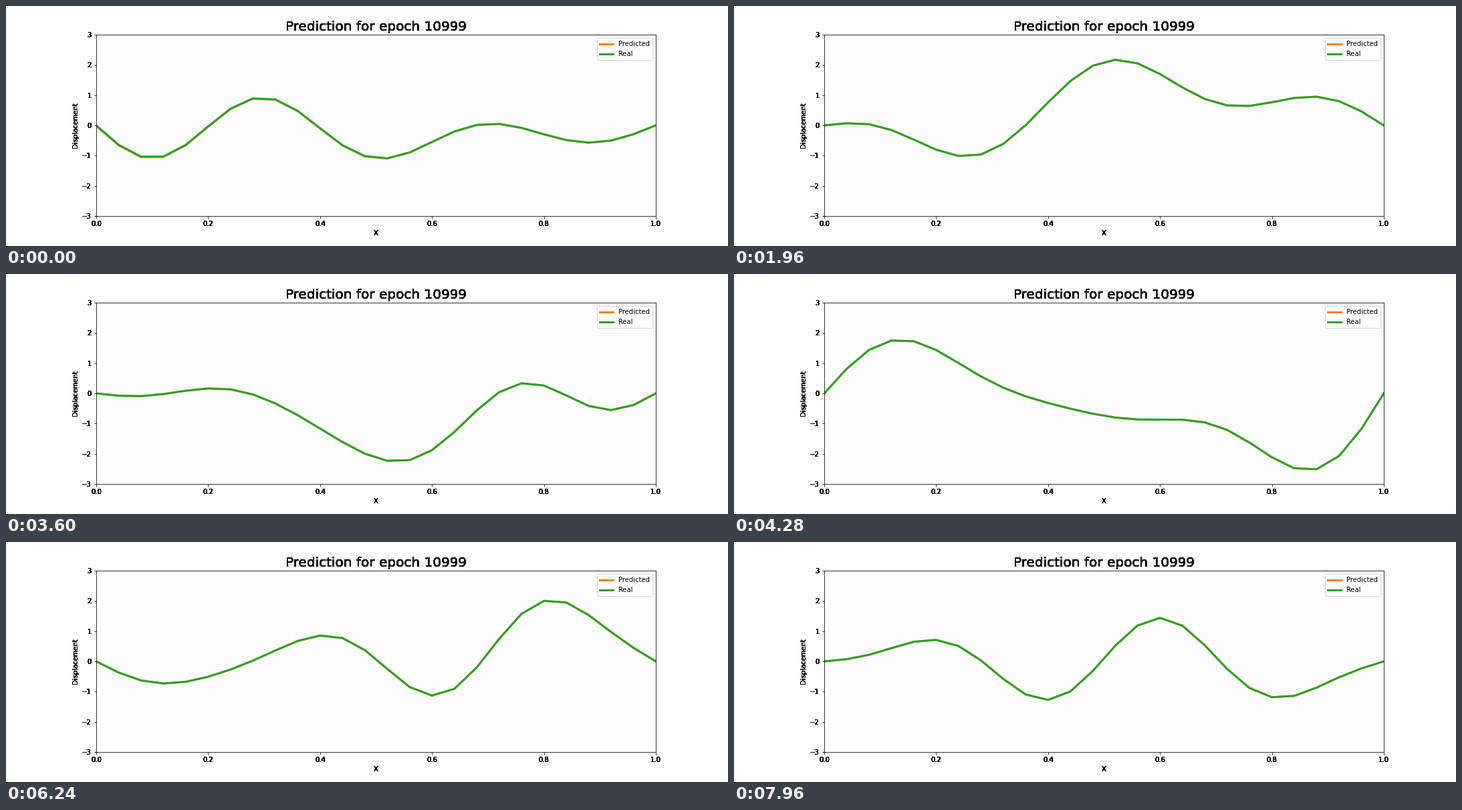
These frames come from a looping animation (1080 px wide and 360 px high, 8 s). A matplotlib script:

```python
import numpy as np
import matplotlib.pyplot as plt
from matplotlib.animation import FuncAnimation

FRAMES, INTERVAL = 200, 40
TEXT_PASSES = 12

x = np.linspace(0, 1, 26)


def swing(t, size, crest, period, centre, spread):
    """Oscillation that swells and fades around one moment."""
    envelope = np.exp(-((t - centre) / spread) ** 2)
    return size * envelope * np.cos(2 * np.pi * (t - crest) / period)


# Harmonics of the string, lowest first; the energy drifts to the higher ones
HARMONICS = [
    dict(size=1.20, crest=38, period=110, centre=65, spread=75),
    dict(size=2.15, crest=20, period=92, centre=65, spread=75),
    dict(size=0.75, crest=89, period=72, centre=90, spread=95),
    dict(size=1.05, crest=28, period=84, centre=160, spread=190),
    dict(size=0.75, crest=44, period=92, centre=0, spread=130),
    dict(size=0.50, crest=33, period=66, centre=199, spread=180),
    dict(size=0.27, crest=124, period=64, centre=132, spread=50),
]


def displacement(t):
    return sum(swing(t, **h) * np.sin(k * np.pi * x)
               for k, h in enumerate(HARMONICS, start=1))


def prediction(t):
    return displacement(t) - 0.02 * np.exp(-t / 10) * (1 - x)


def darken(text):
    """Draw a label several times over, which hardens its edges."""
    draw = text.draw

    def draw_repeatedly(renderer):
        for _ in range(TEXT_PASSES):
            draw(renderer)

    text.draw = draw_repeatedly


plt.rcParams.update({"font.family": "DejaVu Sans", "font.size": 10})
fig = plt.figure(figsize=(15, 5), dpi=72, facecolor="white")
ax = fig.add_axes([0.125, 0.125, 0.775, 0.755], facecolor="#fdfdfd")
ax.set_xlim(0, 1)
ax.set_ylim(-3, 3)
title = ax.set_title("Prediction for epoch 10999", fontsize=20)
x_label = ax.set_xlabel("X")
y_label = ax.set_ylabel("Displacement")
for label in [title, x_label, y_label,
              *ax.get_xticklabels(), *ax.get_yticklabels()]:
    darken(label)

pred_line, = ax.plot(x, prediction(0), color="C1", lw=3, label="Predicted")
real_line, = ax.plot(x, displacement(0), color="C2", lw=3, label="Real")
ax.legend(loc="upper right")


def update(t):
    pred_line.set_ydata(prediction(t))
    real_line.set_ydata(displacement(t))
    return pred_line, real_line


anim = FuncAnimation(fig, update, frames=FRAMES, interval=INTERVAL,
                     repeat=True, repeat_delay=0)
plt.show()
```
